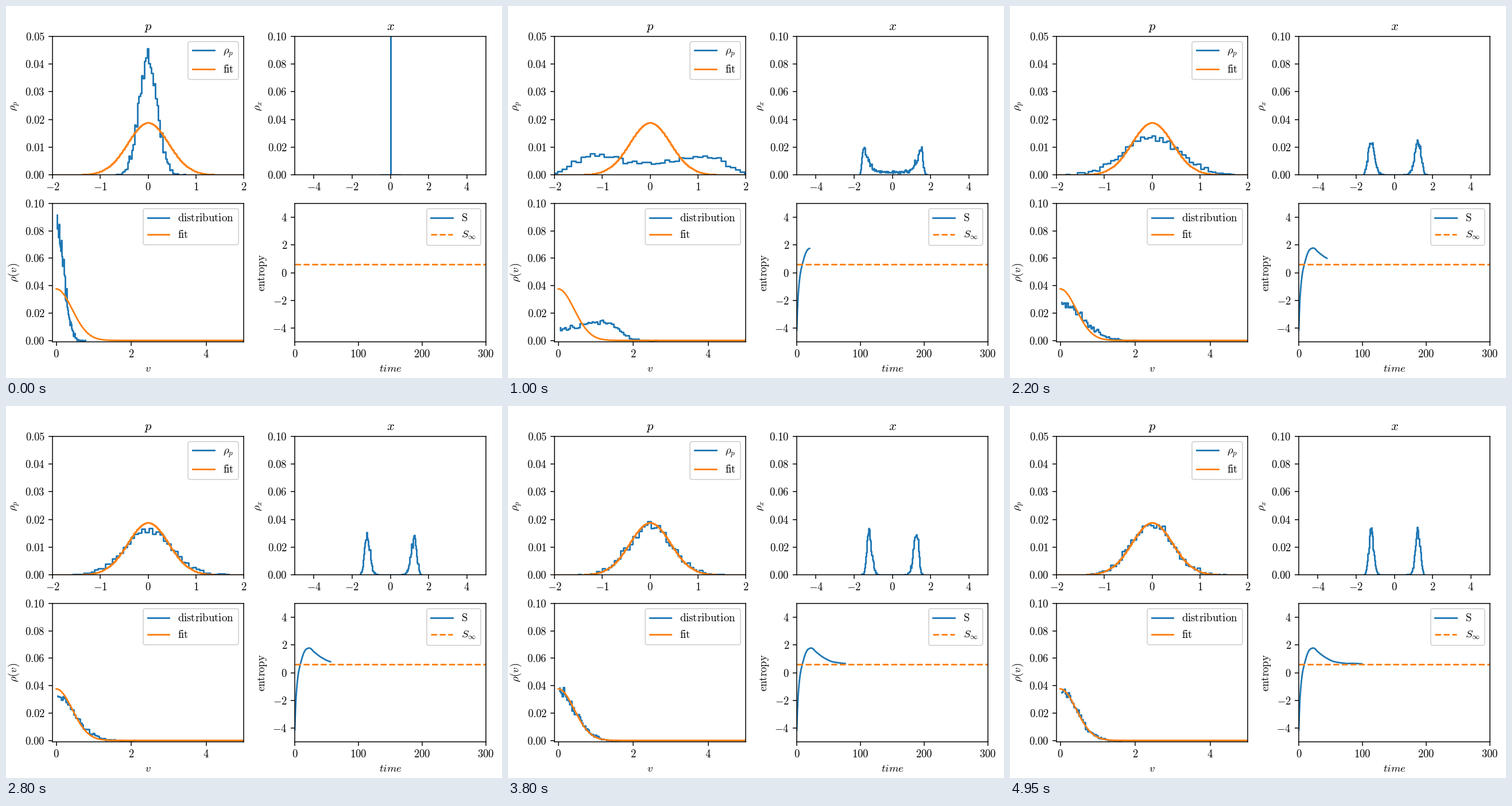
A matplotlib script for the animation above (5000 ms loop, 864 by 648 pixels).

```python
import numpy as np
import matplotlib.pyplot as plt
from matplotlib.animation import FuncAnimation

W, H, DPI = 864, 648, 135
FRAMES, INTERVAL = 100, 50
BLUE, ORANGE = "C0", "C1"

plt.rcParams.update({
    "font.family": "Liberation Serif",
    "mathtext.fontset": "cm",
    "legend.labelspacing": 0.58,
    "legend.borderpad": 0.42,
})

# Langevin particles released at the top of the double well x^4 - 3x^2
COUNT = 5000
TEMP, GAMMA = 0.18, 0.9
DT, SUBSTEPS = 0.01, 10
SCALE = 0.02  # densities are shown per cell of this width


def simulate():
    rng = np.random.default_rng(7)
    x = np.zeros(COUNT)
    p = rng.normal(0, 0.19, COUNT)
    kick = np.sqrt(2 * GAMMA * TEMP * DT)
    states = []
    for _ in range(FRAMES):
        states.append((x.copy(), p.copy()))
        for _ in range(SUBSTEPS):
            force = 6 * x - 4 * x**3 - GAMMA * p
            p = p + force * DT + kick * rng.standard_normal(COUNT)
            x = x + p * DT
    return states


def density(values, bins):
    h, edges = np.histogram(values, bins=bins, density=True)
    return edges[1:], h * SCALE


def gauss(p):
    return SCALE * np.exp(-p**2 / (2 * TEMP)) / np.sqrt(2 * np.pi * TEMP)


def entropy_curve():
    t = [0, 1, 2, 3, 4, 5, 6, 7.5, 9, 12, 14, 16, 18, 20, 22, 24, 26, 29,
         35, 40, 44, 50, 55, 60, 68, 75, 85, 99]
    s = [-4.15, -2.8, -1.8, -1.15, -0.65, -0.27, 0.05, 0.38, 0.65, 1.15,
         1.41, 1.6, 1.7, 1.75, 1.78, 1.77, 1.71, 1.55,
         1.32, 1.15, 1.04, 0.89, 0.8, 0.75, 0.7, 0.66, 0.67, 0.64]
    return np.interp(np.arange(FRAMES), t, s)


fig = plt.figure(figsize=(W / DPI, H / DPI), dpi=DPI)


def panel(left, top, xlim, ylim, xticks, yticks, yfmt):
    width, height = 333, 241
    ax = fig.add_axes([left / W, 1 - (top + height) / H, width / W, height / H])
    ax.set(xlim=xlim, ylim=ylim)
    ax.set_xticks(xticks, [f"${v}$" for v in xticks])
    ax.set_yticks(yticks, [f"${v:{yfmt}}$" for v in yticks])
    return ax


hundredths = np.arange(6) / 100
ax_p = panel(81, 53, (-2, 2), (0, 0.05), range(-2, 3), hundredths, ".2f")
ax_x = panel(503, 53, (-5, 5), (0, 0.1), range(-4, 5, 2), 2 * hundredths, ".2f")
ax_v = panel(81, 344, (-0.1, 5), (-0.001, 0.1), range(0, 5, 2),
             2 * hundredths, ".2f")
ax_s = panel(503, 344, (0, 300), (-5, 5), range(0, 301, 100),
             range(-4, 5, 2), "d")

ax_p.set(title="$p$", ylabel=r"$\rho_p$")
ax_x.set(title="$x$", ylabel=r"$\rho_x$")
ax_v.set(xlabel="$v$", ylabel=r"$\rho(v)$")
ax_s.set(xlabel="$time$", ylabel=r"$\mathrm{entropy}$")

FIT = r"$\mathrm{fit}$"
p_grid = np.linspace(-2, 2, 201)
v_grid = np.linspace(0, 5, 251)

p_line, = ax_p.step([], [], color=BLUE, label=r"$\rho_p$")
ax_p.step(p_grid, gauss(p_grid), where="mid", color=ORANGE, label=FIT)
x_line, = ax_x.step([], [], color=BLUE)
v_line, = ax_v.step([], [], color=BLUE, label=r"$\mathrm{distribution}$")
ax_v.plot(v_grid, 2 * gauss(v_grid), color=ORANGE, label=FIT)
s_line, = ax_s.plot([], [], color=BLUE, label=r"$\mathrm{S}$")
ax_s.plot([0, 300], [0.6, 0.6], "--", color=ORANGE, label=r"$S_\infty$")

for ax in (ax_p, ax_v, ax_s):
    ax.legend(loc="upper right")

states = simulate()
entropy = entropy_curve()


def update(i):
    x, p = states[i]
    p_line.set_data(*density(p, 50))
    x_line.set_data(*density(x, 100))
    v_line.set_data(*density(np.abs(p), 50))
    s_line.set_data(np.arange(i + 1), entropy[:i + 1])
    return p_line, x_line, v_line, s_line


anim = FuncAnimation(fig, update, frames=FRAMES, interval=INTERVAL,
                     repeat=True, repeat_delay=0)
plt.show()
```
